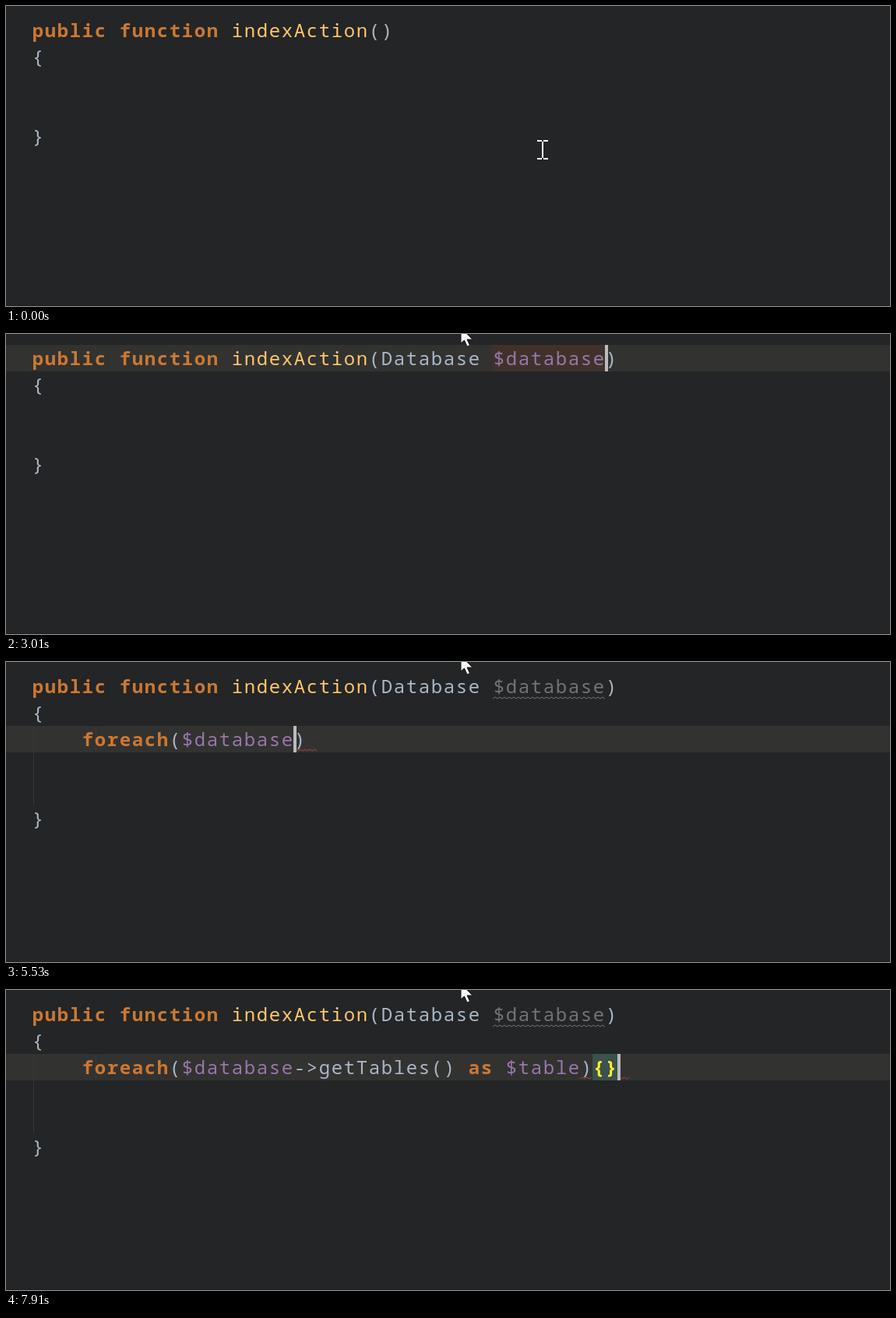
Recreate the animation shown at these times as an HTML page. Size 1135 by 385 pixels, loop 8000 ms.

```html
<!DOCTYPE html>
<html lang="en">
<head>
<meta charset="utf-8">
<title>Code completion</title>
<style>
  html, body { margin: 0; width: 100%; height: 100%; overflow: hidden; background: #232526; }
  svg { display: block; width: 1135px; height: 385px; }
  /* 14.4px glyph advance plus spacing gives the 16px cell; the shift centres glyphs in it. */
  text { white-space: pre; fill: #a9b7c6; font: 24px "Noto Sans Mono", monospace; letter-spacing: 1.6px; transform: translateX(.8px); }
  .kw { fill: #cc7832; font-weight: 700; }
  .fn { fill: #ffc66d; }
  .var { fill: #9876aa; }
  .unused { fill: #727474; }
  .match { fill: #ffef28; font-weight: 700; }
  .item { fill: #8b8d8e; }
  .hit { fill: #9c5f9f; }
  .bold { font-weight: 700; }
  .dim { fill: #5f6163; }
  .hint, .glyph { letter-spacing: 0; transform: none; }
  .hint { font: 23px "Open Sans", "Noto Sans", sans-serif; fill: #bbb; }
  .link { fill: #589df6; text-decoration: underline; }
  .glyph { font: 18px "Open Sans", "Noto Sans", sans-serif; fill: #3f3434; text-anchor: middle; }
</style>
</head>
<body>
<svg viewBox="0 0 1135 385">
  <rect width="1135" height="385" fill="#232526"/>
  <rect y="384" width="1135" height="1" fill="#1c1d1e"/>
  <g id="editor"></g>
  <path id="beam" d="M-7 -11H-1M1 -11H7M0 -10V11M-7 12H-1M1 12H7" fill="none" stroke="#fff" stroke-width="2"/>
  <path id="arrow" d="M0 0V20L4.5 16L8 24L11.5 22.5L8 15H15Z" fill="#fff" stroke="#151515"/>
</svg>
<script>
const LOOP = 8000, STEP = 70, CHAR = 16, LINE = 34, ROW = 38, LEFT = 33, INDENT = 97;
const $ = id => document.getElementById(id);

const esc = s => s.replace(/&/g, '&amp;').replace(/</g, '&lt;').replace(/>/g, '&gt;');
const span = (cls, s) => `<tspan class="${cls}">${esc(s)}</tspan>`;
const text = (x, y, body, attrs = '') => `<text x="${x}" y="${y}" ${attrs}>${body}</text>`;
const rect = (x, y, w, h, fill, attrs = '') =>
  `<rect x="${x}" y="${y}" width="${w}" height="${h}" fill="${fill}" ${attrs}/>`;
const lineTop = row => 14 + row * LINE;
const baseline = row => lineTop(row) + 26;

function wave(x1, x2, y, color) {
  let d = `M${x1} ${y}`;
  for (let x = x1, up = true; x + 3 <= x2; x += 3, up = !up) d += `l3 ${up ? -2 : 2}`;
  return `<path d="${d}" fill="none" stroke="${color}"/>`;
}

// In item names, the parts between tildes match the typed prefix.
const fx = (name, args, type) => ({ icon: 'fx', name, args, type });
const method = (name, path) => ({ icon: 'm', lock: true, bold: true, name, args: '()', path });
const cls = (name, path) => ({ icon: 'C', name, path });
const variable = (name, type) => ({ icon: 'v', bold: true, name, type });

const popups = {
  types: { x: 440, row: 1, w: 760, items: [
    cls('~Data~base', ' (Spiral\\Database\\Entities)'),
    cls('~Data~baseManager', ' (Spiral\\Database)'),
    cls('~Data~baseInterface', ' (Spiral\\Database)'),
    cls('~Data~baseException', ' (Spiral\\Database)'),
    cls('~Data~baseConfig', ' (Spiral\\Database)'),
    cls('~Data~Entity', ' (Spiral\\Models)'),
    cls('~Dat~eInterv~a~l', ''),
    cls('~Dat~ePeriod', ''),
    cls('~Dat~eTime', '')] },
  param: { x: 611, row: 1, w: 545, hint: true, items: [{ bold: true, name: '~$~database' }] },
  functions: { x: 24, row: 3, w: 1012, scroll: true, items: [
    { bold: true, name: '~fo~reach' },
    { bold: true, name: '~fo~r' },
    fx('~fo~pen', '(filename : string, mode : string, [use_i…', 'resource'),
    fx('~fo~o_escaper_for_test', '(env : \\Twig_Environment, st…', 'string'),
    fx('~fo~rward_static_call', '(function : callable, [paramet…', 'mixed'),
    fx('~fo~rward_static_call_array', '(function : callable, [p…', 'mixed'),
    fx('~f~info_~o~pen', '([options : int|null = null], [magic…', 'resource')] },
  variables: { x: 200, row: 3, w: 960, items: [
    variable('~$~database', 'Database'), variable('~$~this', ''), variable('~$~GLOBALS', 'array'),
    variable('~$~_COOKIE', 'array'), variable('~$~_ENV', 'array'), variable('~$~_FILES', 'array'),
    variable('~$~_GET', 'array')] },
  methods: { x: 360, row: 3, w: 900, hint: true, items: [
    method('~get~Tables', 'Spiral\\Database\\Entities'),
    method('~get~Name'), method('~get~Prefix'), method('~get~Type')] }
};

const badge = (x, y, letter) =>
  `<circle cx="${x}" cy="${y}" r="14" fill="#b9776f"/>` + text(x, y + 6, letter, 'class="glyph"');

const lock = (x, y) => `<g transform="translate(${x} ${y})">
  <path d="M-8 0V-4a4 4 0 0 1 8 0V0" fill="none" stroke="#58945f" stroke-width="2"/>
  <rect x="-6" y="-1" width="14" height="11" rx="1" fill="#58945f"/>
  <path d="M-2 3H4M1 3V8" stroke="#3c3f41" stroke-width="2"/></g>`;

function drawItem(item, popup, y, selected) {
  const x = popup.x + 73, base = y + 28;
  const name = item.name.split('~').map((part, i) =>
    part && span((i % 2 ? 'hit' : 'item') + (item.bold ? ' bold' : ''), part)).join('');
  let out = text(x, base, name + span(selected ? 'item' : 'dim', item.args || ''));
  if (item.icon) out += badge(popup.x + 21, y + 19, item.icon);
  if (item.lock) out += lock(popup.x + 53, y + 21);
  if (item.type) out += text(popup.x + popup.w - 22, base, span('item', item.type), 'text-anchor="end"');
  if (item.path) {
    const after = x + item.name.replace(/~/g, '').length * CHAR;
    out += text(item.lock ? 837 : after, base, span(selected ? 'item' : 'dim', item.path));
  }
  return out;
}

function drawPopup(p) {
  const top = lineTop(p.row), listH = p.items.length * ROW;
  const h = listH + (p.hint ? 35 : 2), hintTop = top + 1 + listH;
  let out = rect(p.x + .5, top + .5, p.w - 1, h - 1, '#3c3f41', 'stroke="#b4b6b6"');
  out += rect(p.x + 1, top + 1, p.w - (p.scroll ? 14 : 2), ROW, '#4b4f52');
  if (p.scroll) out += rect(p.x + 1000, top + 2, 9, 49, '#6d6e6f');
  p.items.forEach((item, i) => out += drawItem(item, p, top + 1 + i * ROW, i === 0));
  if (p.hint) {
    out += text(p.x + 2, hintTop + 26, 'Invoke completion again to see more variants.', 'class="hint"');
    out += text(p.x + 509, hintTop + 26, span('link', '>>'), 'class="hint"');
  }
  return out;
}

// Each cue changes part of the state; col counts from the row's own indent.
const typed = (body, col, more) => ({ body, col, ...more });
const call = 'foreach($database->getTables()';
const cues = [
  [0, { type: '', param: '', mark: '', body: '', row: -1, col: 0, end: 4, popup: '', match: [] }],
  [700, { row: 0, col: 28 }],
  [1190, { type: 'D', col: 29 }],
  [1260, { type: 'Da', col: 30 }],
  [1330, { type: 'Dat', col: 31 }],
  [1400, { type: 'Data', col: 32 }],
  [1540, { popup: 'types' }],
  [2030, { type: 'Database', col: 36, popup: '' }],
  [2240, { type: 'Database ', col: 37 }],
  [2380, { param: '$', col: 38 }],
  [2520, { popup: 'param' }],
  [3010, { param: '$database', mark: 'box', col: 46, popup: '' }],
  [3360, { row: 1, col: 1 }],
  [3500, { row: 2, col: 0, end: 5 }],
  [3640, typed('f', 1)],
  [3780, typed('fo', 2, { popup: 'functions' })],
  [4410, typed('foreach', 7, { popup: '' })],
  [4620, typed('foreach()', 8)],
  [4900, typed('foreach($)', 9, { mark: 'unused' })],
  [5040, { popup: 'variables' }],
  [5530, typed('foreach($database)', 17, { popup: '' })],
  [5670, typed('foreach($database-)', 18)],
  [5740, typed('foreach($database->)', 19)],
  [5880, typed('foreach($database->g)', 20)],
  [6020, typed('foreach($database->ge)', 21)],
  [6090, typed('foreach($database->get)', 22)],
  [6230, { popup: 'methods' }],
  [6510, typed(call + ')', 30, { popup: '' })],
  [6580, typed(call + ' )', 31)],
  [6650, typed(call + ' a)', 32)],
  [6790, typed(call + ' as )', 34)],
  [6860, typed(call + ' as $)', 35)],
  [6930, typed(call + ' as $ta)', 37)],
  [7070, typed(call + ' as $table)', 40)],
  [7490, { col: 41, match: [7, 40] }],
  [7700, typed(call + ' as $table){}', 42, { match: [41, 42] })],
  [7910, { col: 43 }]
];

function drawBody(s) {
  const pattern = /\b(?:foreach|as)\b|\$\w*|[(){}]|[^$(){}]+?(?=\bas\b|[$(){}]|$)/g;
  const tokens = s.body.replace(pattern, (part, at) => {
    if (s.match.includes(at)) return span('match', part);
    if (part === 'foreach' || part === 'as') return span('kw', part);
    return part[0] === '$' ? span('var', part) : esc(part);
  });
  return text(INDENT, baseline(2), tokens);
}

function drawErrors(body) {
  const n = body.length;
  const ranges = body.endsWith('}') ? [[n - 3, n - 2], [n, n + 1]] : [[n - 1, n + 1]];
  return ranges.map(([a, b]) => wave(INDENT + a * CHAR, INDENT + b * CHAR, lineTop(2) + 32, '#a8433c')).join('');
}

function drawEditor(s) {
  const paramX = LEFT + 37 * CHAR, caretLeft = s.row === 2 ? INDENT : LEFT;
  let out = '';
  if (s.row >= 0) out += rect(0, lineTop(s.row), 1135, LINE, '#323231');
  if (s.row === 2) out += rect(115, lineTop(2), 1, LINE, '#393938');
  if (s.mark === 'box') out += rect(paramX, lineTop(0), 9 * CHAR, LINE, '#40322b');
  if (s.mark === 'unused') {
    out += rect(35, lineTop(2), 1, 3 * LINE, '#363838');
    out += wave(paramX, paramX + 9 * CHAR, lineTop(0) + 33, '#737676');
  }
  for (const col of s.match) out += rect(INDENT + col * CHAR, lineTop(2), CHAR, LINE, '#3b514d');
  out += text(LEFT, baseline(0), span('kw', 'public function') + ' ' + span('fn', 'indexAction') +
    '(' + s.type + span(s.mark === 'unused' ? 'unused' : 'var', s.param) + ')');
  out += text(LEFT, baseline(1), '{') + text(LEFT, baseline(s.end), '}');
  out += drawBody(s);
  if (s.mark === 'unused') out += drawErrors(s.body);
  if (s.row >= 0) out += rect(caretLeft + s.col * CHAR, lineTop(s.row), 4, LINE, '#bbb');
  if (s.popup) out += drawPopup(popups[s.popup]);
  return out;
}

const path = [[0, 689, 184], [70, 680, 176], [560, 484, 34], [770, 484, 34], [980, 584, -8], [LOOP, 584, -8]];
function mouseAt(t) {
  const i = path.findIndex(p => p[0] > t);
  const [t0, x0, y0] = path[i - 1], [t1, x1, y1] = path[i];
  const k = (t - t0) / (t1 - t0);
  return [x0 + (x1 - x0) * k, y0 + (y1 - y0) * k];
}

const start = performance.now();
let shown = -1;
function frame() {
  const t = (performance.now() - start) % LOOP;
  const count = cues.filter(c => c[0] <= t).length;
  if (count !== shown) {
    shown = count;
    $('editor').innerHTML = drawEditor(Object.assign({}, ...cues.slice(0, count).map(c => c[1])));
  }
  const [x, y] = mouseAt(Math.floor(t / STEP) * STEP);
  const isArrow = y < 10;
  $('beam').style.display = isArrow ? 'none' : '';
  $('arrow').style.display = isArrow ? '' : 'none';
  $(isArrow ? 'arrow' : 'beam').setAttribute('transform', `translate(${x} ${y})`);
  requestAnimationFrame(frame);
}
frame();
</script>
</body>
</html>
```
